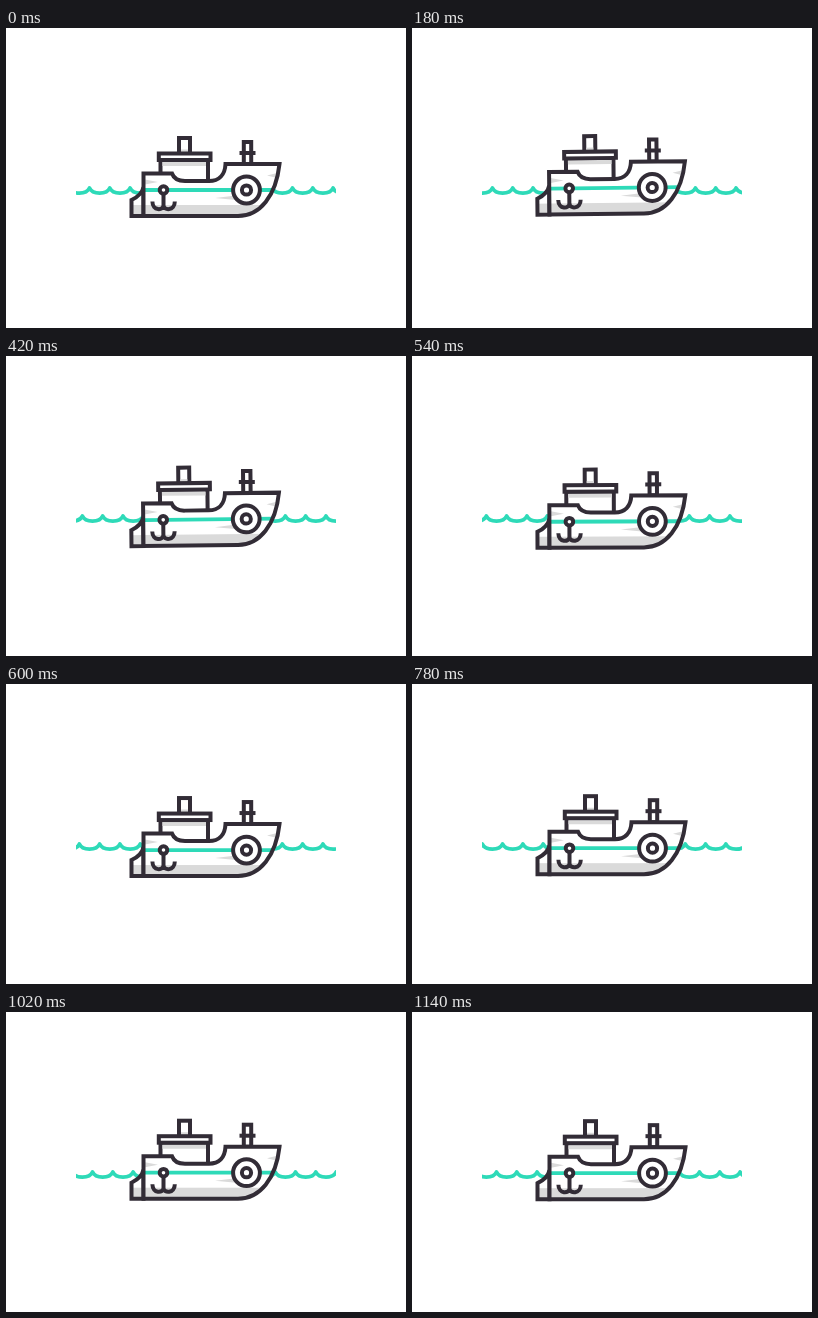
Animation, 400 px wide and 300 px high, one loop 1200 ms. Source, as an HTML page:

```html
<!DOCTYPE html>
<html lang="en">
<head>
<meta charset="utf-8">
<title>Boat on waves</title>
<style>
  html, body { margin: 0; width: 100%; height: 100%; overflow: hidden; background: #fff; }
  svg { display: block; width: 100%; height: 100%; }
  .ink { fill: #fff; stroke: #322c36; stroke-width: 4; }
  .bare { fill: none; }
  .shade { fill: #dadada; }
  .sea { fill: none; stroke: #2edab8; stroke-width: 3.8; }
</style>
</head>
<body>
<svg viewBox="0 0 400 300">
  <defs>
    <clipPath id="view"><rect x="70" y="100" width="260" height="100"/></clipPath>
    <clipPath id="hullClip"><use href="#hull"/></clipPath>
    <clipPath id="sternClip"><use href="#stern"/></clipPath>
    <path id="hull" d="M137.5 145.5H166C168 151 172 153 179 153H203C213 153 219 147 219.5 136H273.5C270 168 254 188 232 188H137.5Z"/>
    <path id="stern" d="M137.5 159Q136 167 125.5 172V188H137.5Z"/>
  </defs>

  <g clip-path="url(#view)">
    <path id="wave" class="sea" stroke-linejoin="round"/>
  </g>

  <g id="boat">
    <g class="ink">
      <rect x="173" y="110" width="11" height="16"/>
      <rect x="154.5" y="132" width="47.5" height="24"/>
      <rect x="237.8" y="114" width="7.4" height="22"/>
      <path d="M233.5 125H249.5"/>
    </g>
    <path class="shade" d="M175 121.5h7v3h-7zM156.5 134H200v4H156.5z"/>
    <rect class="ink" x="152.8" y="125.5" width="51.7" height="6.5"/>

    <use href="#stern" fill="#fff"/>
    <rect class="shade" x="124" y="177" width="14" height="11" clip-path="url(#sternClip)"/>
    <use href="#stern" class="ink bare"/>

    <use href="#hull" fill="#fff"/>
    <g class="shade" clip-path="url(#hullClip)">
      <rect x="137" y="177" width="130" height="11"/>
      <path d="M139 151.5L152 154L139 156.5ZM209 170L230 167.5V172ZM261 147.5L273 144.5V150.5Z"/>
    </g>
    <path class="sea" d="M139 162H268"/>
    <use href="#hull" class="ink bare"/>

    <g class="ink">
      <circle cx="240.5" cy="162" r="13.4"/>
      <circle cx="240.5" cy="162" r="4.6"/>
    </g>
    <g class="ink" stroke-width="3.6">
      <path class="bare" d="M157.5 166V180M146.4 173.5C146.4 183 157.5 183 157.5 177C157.5 183 168.8 183 168.8 173.5"/>
      <circle cx="157.5" cy="162" r="3.8"/>
    </g>
  </g>
</svg>
<script>
  const LOOP = 1200, STEP = 60, PERIOD = 20.3;
  const wave = document.getElementById('wave');
  const boat = document.getElementById('boat');

  wave.setAttribute('d', 'M42.9 160' + `c3 6.8 ${PERIOD - 3} 6.8 ${PERIOD} 0`.repeat(16));

  function draw(now) {
    const t = Math.floor(now % LOOP / STEP) * STEP;
    wave.setAttribute('transform', `translate(${-PERIOD * t / LOOP} 0)`);

    // Bob up and down; the bow lifts only during the first half
    const y = 1.35 + 2.7 * Math.cos(2 * Math.PI * (t - 600) / 900);
    const tilt = t < 600 ? -0.75 * Math.sin(Math.PI * t / 600) : 0;
    boat.setAttribute('transform', `translate(0 ${y}) rotate(${tilt} 126 188)`);
  }

  const start = performance.now();
  function tick() {
    draw(performance.now() - start);
    requestAnimationFrame(tick);
  }
  tick();
</script>
</body>
</html>
```
